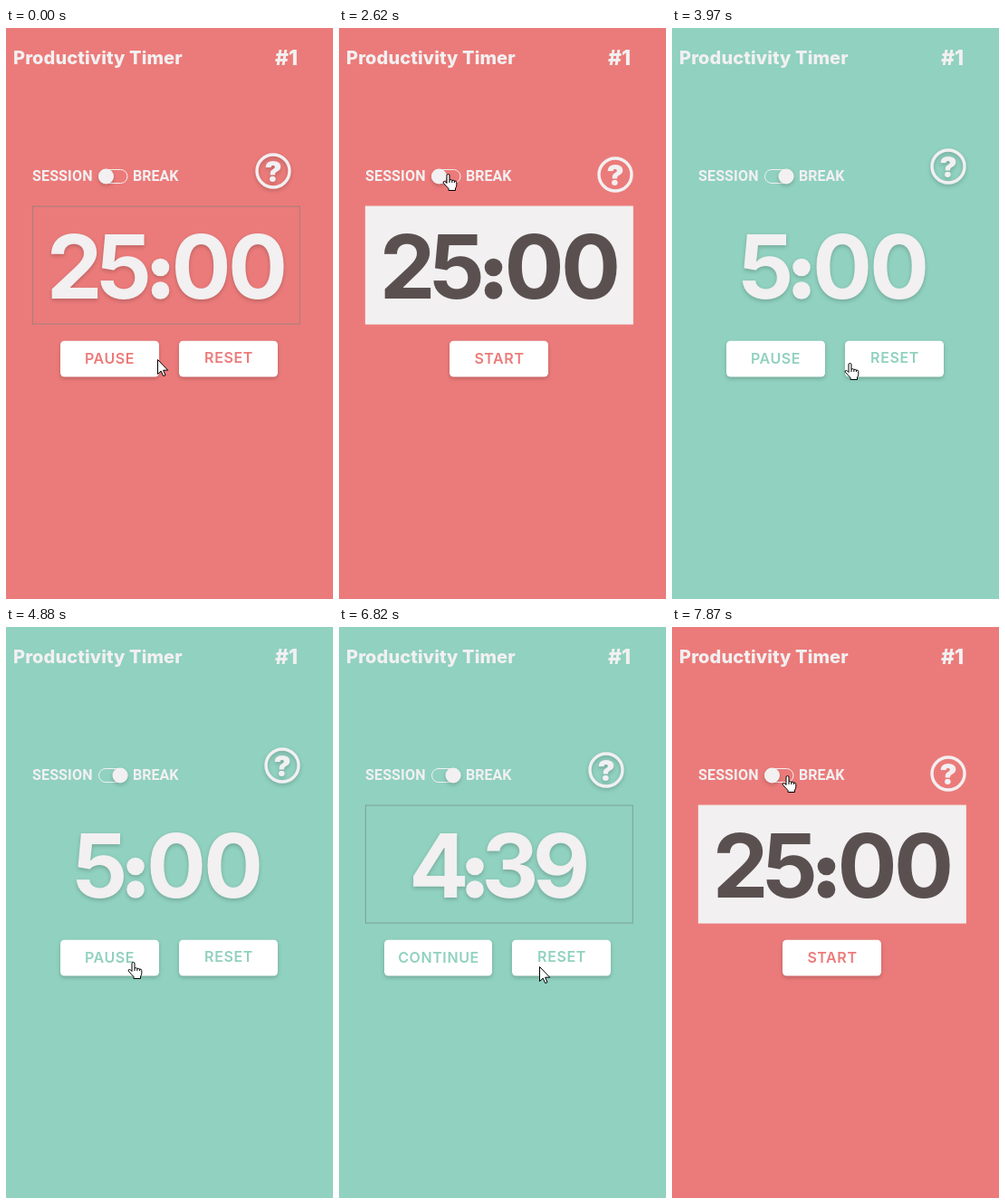
Animation of 361 by 631 pixels, one loop 8 s. Source, as an HTML page:

```html
<!DOCTYPE html>
<html lang="en">
<head>
<meta charset="utf-8">
<title>Productivity Timer</title>
<style>
  html, body { margin: 0; width: 100%; height: 100%; overflow: hidden; }
  svg { display: block; width: 361px; height: 631px; background: var(--bg); }
  text { font-family: Inter, "Open Sans", sans-serif; font-weight: 800; fill: #f2f0f1; }
  .label { font: 700 16px Roboto, sans-serif; }
  .mid { text-anchor: middle; }
  .shade { filter: drop-shadow(0 2px 2px rgba(0, 0, 0, .2)); }
  .flat .soft { filter: none; }
  #clock { fill: var(--ink); }
  #time { font-size: 98px; font-weight: 750; fill: inherit; }
  #time tspan { fill: none; }
  .button text { font-size: 16px; font-weight: 600; letter-spacing: .6px; fill: var(--bg); }
  .button rect { fill: #fff; }
  #cursor path { fill: #fff; stroke: #000; stroke-linejoin: round; }
</style>
</head>
<body>
<svg id="stage" viewBox="0 0 361 631">
  <text x="8" y="40" font-size="20" letter-spacing=".1">Productivity Timer</text>
  <text x="297" y="41" font-size="23">#1</text>

  <text class="label" x="29" y="169" letter-spacing=".15">SESSION</text>
  <text class="label" x="140" y="169">BREAK</text>
  <rect x="102.5" y="156.5" width="31.5" height="15" rx="7.5" fill="none" stroke="#f2f0f1"/>
  <circle id="knob" class="shade" cy="164" r="8.5" fill="#f2f0f1"/>

  <g id="help"><g class="shade soft">
    <circle r="18" fill="none" stroke="#f2f0f1" stroke-width="3.4"/>
    <text class="mid" y="11.8" font-size="32" style="font-weight:900">?</text>
  </g></g>

  <rect id="panel" x="29.4" y="197.1" width="294.9" height="130"/>
  <g id="clock" class="shade soft">
    <text id="time" class="mid" y="299"></text>
    <g id="dots"><circle cy="264.5" r="9.8"/><circle cy="290" r="9.8"/></g>
  </g>

  <g id="main" class="button shade">
    <rect y="345.7" height="39.8" rx="4.5"/><text class="mid" y="371"></text>
  </g>
  <g id="reset" class="button shade">
    <rect x="191" y="345.7" width="109" height="39.8" rx="4.5"/><text class="mid" x="246" y="370">RESET</text>
  </g>

  <g id="cursor">
    <path id="arrow" d="M.5 .5V16.5L4.2 13.1 6.7 18.6 9 17.6 6.6 12.2H11.7Z"/>
    <path id="hand" d="M5 10.5V2a1.5 1.5 0 0 1 3 0V7q1.6-.9 2.8.4 1.6-.6 2.6.6 2.4-.3 2.4 1.6v3q0 2-1.3 3.5v2.4H7V16.5Q5 14.5 1.2 10.2 .6 8.6 2.4 8.4 3.6 8.6 5 10.5M8 7v3M10.8 7.4v2.6M13.4 8v2"/>
  </g>
</svg>
<script>
const LOOP = 8000, RED = "#eb7b7a", GREEN = "#90d1bf";
const LIGHT = "#f2f0f1", DARK = "#5b5050";

// Centre of each character of the clock
const centres = {
  "25:00": [75.5, 130.5, 170.5, 215.5, 278],
  "5:00": [104, 143, 188, 251],
  "4:39": [110.5, 150, 189, 245.5]
};

// Main button: left edge, width, text centre
const buttons = {
  START: [122, 109, 177],
  PAUSE: [60, 109, 114.5],
  CONTINUE: [50, 119, 110]
};

// Start, background, clock, main button, help position, panel outline
const scenes = [
  [0, RED, "25:00", "PAUSE", 295, 158, true],
  [980, RED, "25:00", "CONTINUE", 295, 158, true],
  [1480, RED, "25:00", "START", 305, 162],
  [2900, GREEN, "5:00", "START", 305, 153],
  [3970, GREEN, "5:00", "PAUSE", 305, 153],
  [5180, GREEN, "4:39", "PAUSE", 295, 158, true],
  [5460, GREEN, "4:39", "CONTINUE", 295, 158, true],
  [7120, GREEN, "5:00", "START", 305, 153],
  [7870, RED, "25:00", "START", 305, 162]
];

// Cursor moves: first step, last step, step count, end x, end y, hand on arrival
const moves = [
  [0, 0, 1, 167, 366],
  [130, 130, 1, 162, 366, true],
  [980, 1300, 3, 232, 370, true],
  [1480, 1480, 1, 233, 371],
  [2080, 2480, 4, 119, 165],
  [2620, 2620, 1, 114, 161, true],
  [3180, 3570, 4, 212, 391],
  [3840, 3840, 1, 190, 370, true],
  [4510, 4880, 4, 134, 370, true],
  [6270, 6820, 5, 221, 375],
  [6970, 6970, 1, 217, 375, true],
  [7280, 7720, 4, 126, 164],
  [7870, 7870, 1, 121, 164, true]
];

const $ = id => document.getElementById(id);
const set = (el, attrs) => {
  for (const name in attrs) el.setAttribute(name, attrs[name]);
};
const place = (el, x, y) => set(el, { transform: `translate(${x} ${y})` });
const lastBefore = (list, t) => list.findLastIndex(item => item[0] <= t);

// The colon keeps its place in the text; its low dots are drawn beside it
function drawClock(clock) {
  const xs = centres[clock];
  set($("time"), { x: xs.join(" ") });
  $("time").innerHTML = clock.replace(":", "<tspan>:</tspan>");
  place($("dots"), xs[clock.indexOf(":")], 0);
}

function drawScene(t) {
  const [, bg, clock, label, helpX, helpY, outlined] = scenes[lastBefore(scenes, t)];
  const idle = label === "START";
  const vars = document.documentElement.style;
  vars.setProperty("--bg", bg);
  vars.setProperty("--ink", idle ? DARK : LIGHT);
  $("stage").classList.toggle("flat", idle && bg === RED);
  set($("knob"), { cx: bg === RED ? 110.5 : 126 });
  place($("help"), helpX, helpY);
  set($("panel"), {
    fill: idle ? LIGHT : "none",
    stroke: idle ? LIGHT : outlined ? "rgba(115,130,125,.6)" : "none"
  });
  drawClock(clock);

  const [x, width, mid] = buttons[label];
  const [box, caption] = $("main").children;
  set(box, { x, width });
  set(caption, { x: mid });
  caption.textContent = label;
  $("reset").style.display = idle ? "none" : "";
}

function drawCursor(t) {
  const i = lastBefore(moves, t);
  const [start, end, count, x, y, hand] = moves[i];
  const [, , , fromX, fromY] = moves[Math.max(i - 1, 0)];
  const gap = (end - start) / (count - 1) || 1;
  const step = Math.min(count, Math.floor((t - start) / gap + 1e-6) + 1);
  const part = step / count;
  place($("cursor"), fromX + (x - fromX) * part, fromY + (y - fromY) * part);
  const pointing = hand && step === count;
  $("hand").style.display = pointing ? "" : "none";
  $("arrow").style.display = pointing ? "none" : "";
}

const begin = performance.now();
function frame() {
  const t = (performance.now() - begin) % LOOP;
  drawScene(t);
  drawCursor(t);
  requestAnimationFrame(frame);
}
frame();
</script>
</body>
</html>
```
